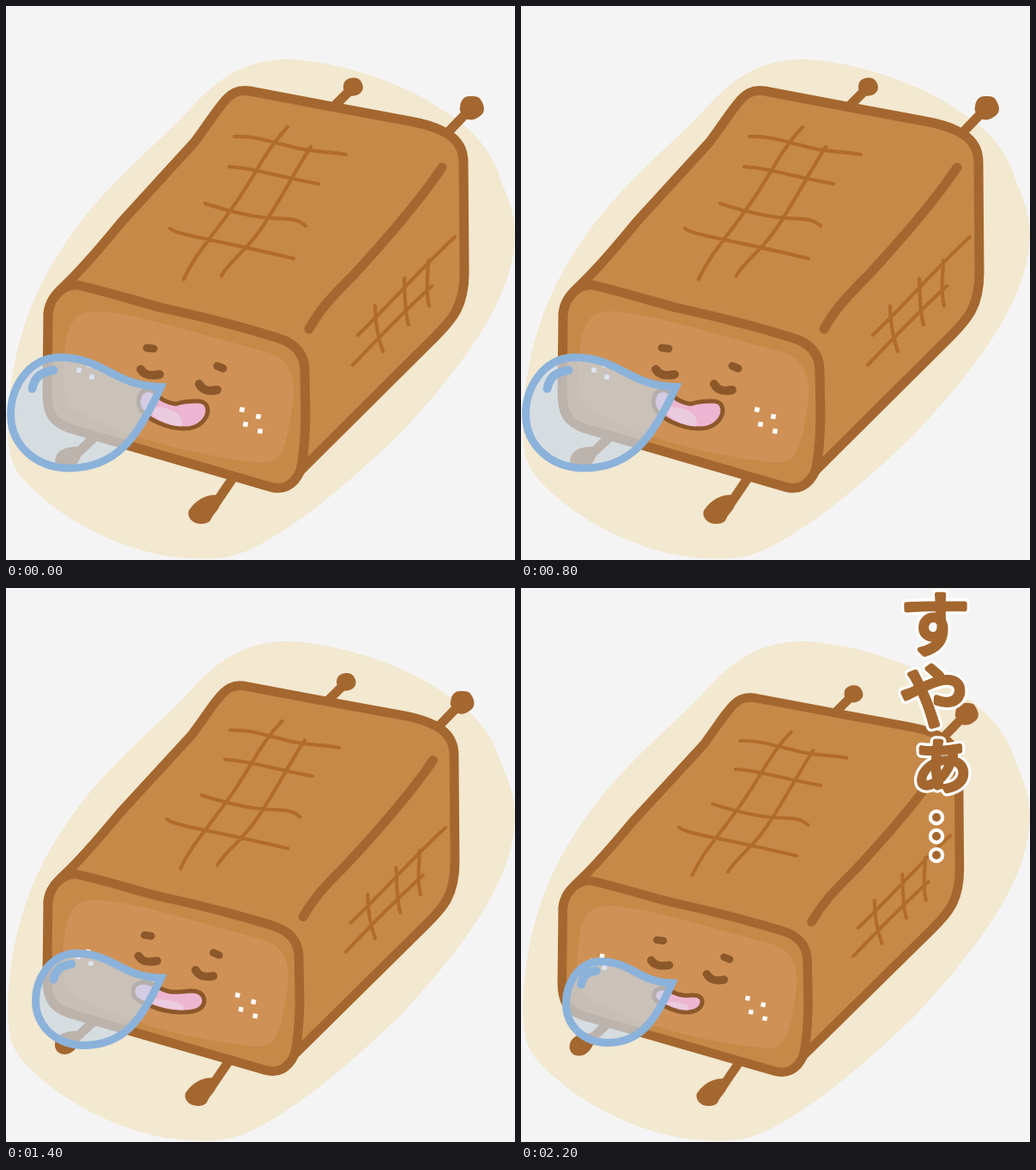
Recreate the animation shown at these times as an HTML page. Size 593 by 645 pixels, loop 3200 ms.

```html
<!DOCTYPE html>
<html lang="ja">
<head>
<meta charset="utf-8">
<title>Sleeping loaf</title>
<style>
  html, body { margin: 0; width: 100%; height: 100%; overflow: hidden; background: #f4f4f4; }
  svg { display: block; width: 100%; height: 100%; }
  path { stroke-linecap: round; }
  .line { fill: none; stroke: #a4672f; stroke-width: 11; stroke-linejoin: round; }
  .limb { fill: #a4672f; }
  .grill { fill: none; stroke: #b16b2a; stroke-width: 4.2; }
  .feature { fill: none; stroke: #8c582a; stroke-linejoin: round; }
  .glass path { vector-effect: non-scaling-stroke; stroke: #8bb2da; }
  text { font: 400 81px "Noto Sans CJK JP", "Noto Sans CJK", sans-serif; text-anchor: middle; }
  .halo { fill: #fff; stroke: #fff; stroke-width: 12.5; stroke-linejoin: round; }
  .ink { fill: #a4672f; stroke: #a4672f; stroke-width: 6; stroke-linejoin: round; }
</style>
</head>
<body>
<svg viewBox="0 0 593 645">
  <path fill="#f3e8d0" d="M325 62C365 62 450 80 510 122C555 150 570 180 577 205C585 222 593 245 593 268C590 340 540 410 460 497C400 555 340 605 290 630C260 645 240 645 200 642C132 634 62 597 20 551C5 533 3 520 2 490C4 410 25 340 70 275C110 215 160 175 205 130C240 92 265 65 325 62Z"/>

  <g id="loaf">
    <!-- arms and legs -->
    <path class="line" d="M384 115L402 97M512 150L538 123M264 550L243 581M104 501L86 518"/>
    <path class="limb" d="M394 89C397 83 409 81 413 87C419 95 415 102 408 104C399 107 390 100 394 89Z"/>
    <path class="limb" d="M529 117C530 109 534 105 540 105C546 105 551 105 553 109C559 118 558 125 551 129C545 134 536 134 532 127C529 123 528 121 529 117Z"/>
    <path class="limb" d="M246 569.500C250 574 249 579 248 584C246 588 241 592 239 597C237 604 224 604 219 601C212 597 211 589 214 586C222 575 234 568 246 569.500Z"/>
    <path class="limb" d="M91 513C88 525 82 541 69 541C56 541 54 526 62 519C70 512 82 513 91 513Z"/>

    <!-- bread -->
    <path class="line" style="fill:#c68948" d="M284 99L400 121L470 134C520 143 533 160 533 182L534 310C534 350 520 365 500 385L343 541C335 559 322 564 308 560L75 492C54 485 48 474 48 450L49 360C50 344 58 335 70 324C95 300 115 275 135 251L220 158C235 138 242 126 252 114C262 101 270 97 284 99Z"/>
    <path fill="#cf9155" d="M110 356C150 357 240 386 305 403C335 413 338 440 334 465C325 520 322 535 290 531C230 525 150 505 100 480C65 465 65 450 67 415C70 380 74 352 110 356Z"/>
    <path class="line" d="M49 358C51 338 68 323 84 325C115 332 150 343 180 351C230 362 270 372 315 386C340 393 348 408 348 425L349 480C348 510 346 530 343 541"/>
    <path class="line" d="M508 188C480 230 440 275 405 313C375 343 365 355 353 376"/>
    <path class="grill" d="M266 152C292 151 310 159 330 163C350 170 375 169 396 173M260 187C290 189 310 197 364 207M232 230C260 239 290 246 310 247C335 248 340 248 349 256M191 259C200 267 240 271 335 294M328 141C300 170 290 200 260 240C235 275 220 290 207 318M355 164C340 187 322 221 304 249C293 267 284 277 273 288C263 298 255 306 251 314"/>
    <path class="grill" d="M523 269C490 298 450 345 410 383M496 326C470 350 440 380 404 418M430 349C430 370 433 385 439 402M464 317C465 335 464 355 469 371M492 296C492 310 488 330 493 349"/>

    <!-- face -->
    <path class="feature" stroke-width="9" d="M164 398L172 399M246 419L253 422"/>
    <path class="feature" stroke-width="10" d="M157 423C161 430 168 431 179 429M225 440C229 448 236 449 246 447"/>
    <path fill="#fff" id="sugar"/>
  </g>

  <path id="mouth" class="feature" style="fill:#edb5d1" stroke-width="5"/>
  <path id="tongue" fill="#ebcbdf"/>
  <g id="bubble" class="glass">
    <path fill="rgb(200,217,234)" fill-opacity=".67" stroke-width="9" stroke-linejoin="miter" d="M0 0C-57 -1.500 -65 -34.500 -120 -34.500C-155 -32.500 -175 1 -175 32C-175 68.500 -145 94.500 -107 94.500C-52 94.500 -27 59 0 0Z"/>
    <path fill="none" stroke-width="10" d="M-150 2C-147 -12 -140 -17 -125 -19.500"/>
  </g>

  <g id="words"></g>
</svg>
<script>
const STEP = 200, LOOP = 3200, WORDS_AT = 2200;
const $ = id => document.getElementById(id);

// Three breathing poses: full, half and empty bubble.
const poses = [
  {
    body: [1, 1], tip: [180.5, 443.5], size: [1, 1],
    mouth: "M166 447C154 447 152 462 157 470C164 480 185 492 208 492C226 492 235 480 235 470C234 461 228 460 222 460C212 460 205 461 199 463C194 464 188 461 182 458C176 454 173 447 166 447Z",
    tongue: "M164 467C185 466 198 471 203 478C206 484 205 489 204 489.500C190 489 172 481 164 467Z"
  },
  {
    body: [.9776, .97], tip: [180.5, 454], size: [.834, .83],
    mouth: "M162 459C146 458 144 474 154 480C170 488 185 494 205 494C222 494 231 489 231 480C230 471 223 469 215 469C207 470 199 471 191 470C178 467 170 460 162 459Z",
    tongue: "M160 479C180 477 200 480 206 486C208 489 207 491 206 491.500C190 491 174 486 160 479Z"
  },
  {
    body: [.953, .9426], tip: [176, 460], size: [.706, .735],
    mouth: "M165 466C155 466 152 476 158 481C168 488 180 494 192 494C206 494 212 487 211 480C210 475 206 474 200 474C192 475 184 474 178 471C173 469 170 466 165 466Z",
    tongue: "M165 482C178 481 191 483 195 487C196 490 195 491 194 491.500C184 491 174 487 165 482Z"
  }
];
const cycle = [0, 1, 2, 1];

const grains = [[275, 470], [294, 478], [279, 487], [296, 495], [97, 418], [85, 424], [100, 432]];
$("sugar").setAttribute("d", grains.map(([x, y]) => `M${x - 2.2} ${y - 3.3}l5.500 1.100l-1.100 5.500l-5.500 -1.100z`).join(""));

const letters = [["す", 482, 72], ["や", 481, 156], ["ぁ", 490, 232]];
$("words").innerHTML = ["halo", "ink"].map(layer =>
  `<g class="${layer}">` +
  letters.map(([char, x, y]) => `<text x="${x}" y="${y}">${char}</text>`).join("") +
  [267, 289, 311].map(y => `<circle cx="484" cy="${y}" r="${layer === "ink" ? 2 : 3}"/>`).join("") +
  "</g>").join("");

function draw(now) {
  const time = now % LOOP;
  const step = Math.floor(time / STEP);
  const pose = poses[time < WORDS_AT ? cycle[step % 4] : 2];
  $("loaf").setAttribute("transform", `translate(43 604) scale(${pose.body}) translate(-43 -604)`);
  $("mouth").setAttribute("d", pose.mouth);
  $("tongue").setAttribute("d", pose.tongue);
  $("bubble").setAttribute("transform", `translate(${pose.tip}) scale(${pose.size})`);
  $("words").style.display = time < WORDS_AT ? "none" : "";
}

const start = performance.now();
function tick() {
  draw(performance.now() - start);
  requestAnimationFrame(tick);
}
tick();
</script>
</body>
</html>
```
